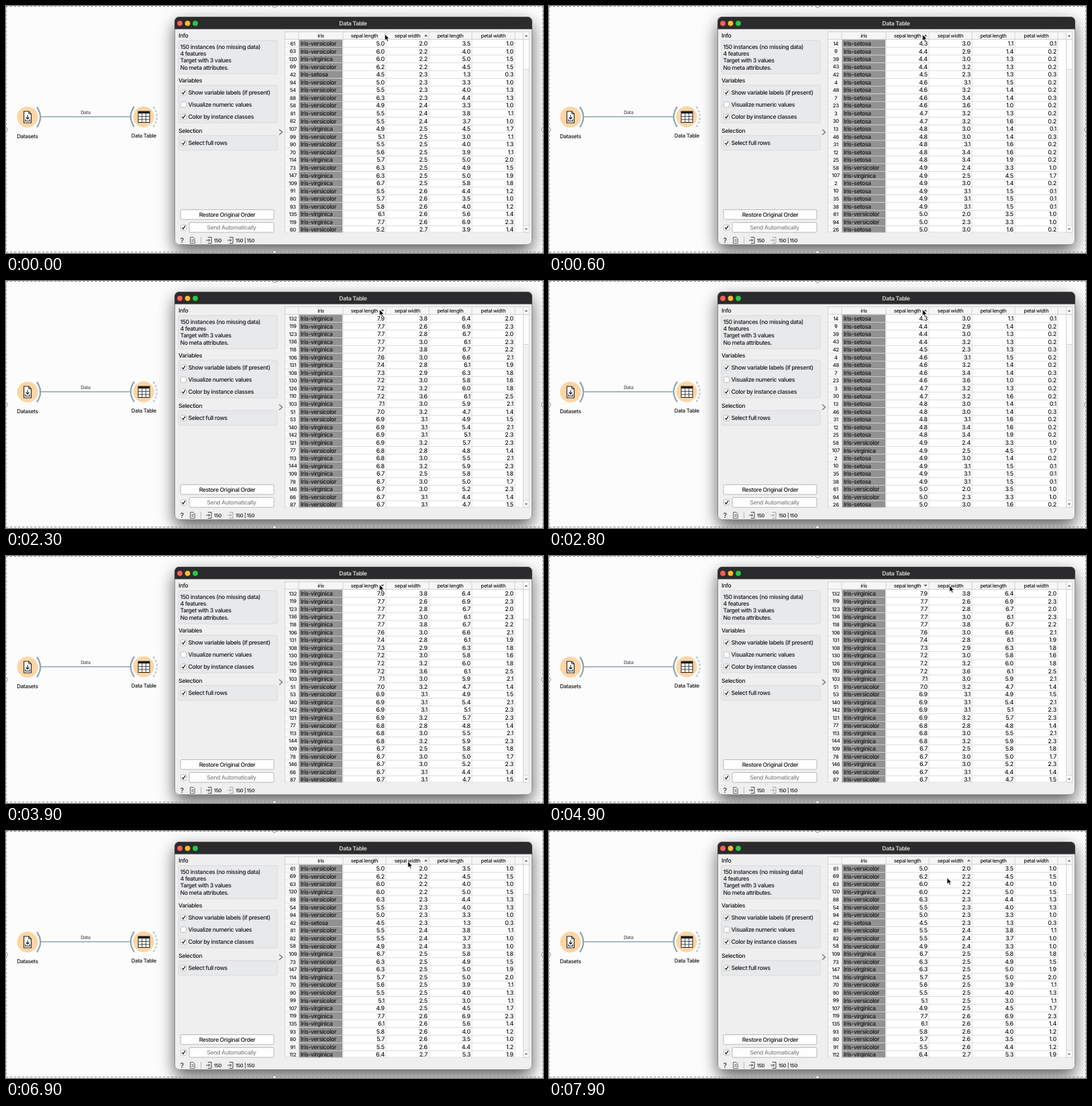
An HTML page that plays this animation: 800 px wide and 368 px high, repeating every 8 s.

```html
<!DOCTYPE html>
<html lang="en">
<head>
<meta charset="utf-8">
<title>Data Table</title>
<style>
  html, body { margin: 0; width: 100%; height: 100%; overflow: hidden; background: #fcfcfc; }
  svg { display: block; width: 800px; height: 368px; }
  text {
    font-family: Inter, "Liberation Sans", sans-serif; font-weight: 500; letter-spacing: -.04em;
    fill: #151515; text-rendering: geometricPrecision;
  }
</style>
</head>
<body>
<svg id="stage" viewBox="0 0 800 368" xmlns="http://www.w3.org/2000/svg">
  <defs>
    <filter id="shadow" x="-20%" y="-20%" width="140%" height="140%">
      <feGaussianBlur stdDeviation="12"/>
    </filter>
    <clipPath id="tableClip"><rect x="415" y="38" width="365" height="299.5"/></clipPath>
    <clipPath id="winClip"><rect x="251" y="16" width="533" height="340" rx="7"/></clipPath>
  </defs>
  <rect width="800" height="368" fill="#fcfcfc"/>
  <g id="flow"></g>
  <rect x="251" y="25" width="533" height="341" rx="9" fill="#000" opacity=".62" filter="url(#shadow)"/>
  <g id="marquee"></g>
  <g id="win" clip-path="url(#winClip)"></g>
  <rect x="251.5" y="16.5" width="532" height="339" rx="7" fill="none" stroke="#555" stroke-opacity=".65"/>
  <g id="table" clip-path="url(#tableClip)"></g>
  <g id="scroll"></g>
  <path id="sortMark" fill="#555"/>
  <path id="pointer" d="M0 0V9.2L2.2 7.3L3.7 10.7L5.3 10L3.9 6.7H6.8Z"
        fill="#000" stroke="#fff" stroke-width=".7" stroke-linejoin="round"/>
</svg>
<script>
const $ = id => document.getElementById(id);

function add(parent, tag, attrs, content) {
  const el = document.createElementNS("http://www.w3.org/2000/svg", tag);
  for (const key in attrs) el.setAttribute(key, attrs[key]);
  if (content !== undefined) el.textContent = content;
  parent.appendChild(el);
  return el;
}
const rect = (p, x, y, width, height, fill, more) => add(p, "rect", { x, y, width, height, fill, ...more });
const path = (p, d, stroke, more) => add(p, "path", { d, stroke, fill: "none", ...more });
const disc = (p, cx, cy, r, fill, more) => add(p, "circle", { cx, cy, r, fill, ...more });
const label = (p, x, y, size, str, more) => add(p, "text", { x, y, "font-size": size, ...more }, str);
const middle = { "text-anchor": "middle" };

// Rows: number, sepal length, sepal width, petal length, petal width
const records = {
  "Iris-setosa": `2 4.9 3.0 1.4 0.2|3 4.7 3.2 1.3 0.2|4 4.6 3.1 1.5 0.2|7 4.6 3.4 1.4 0.3
    |9 4.4 2.9 1.4 0.2|10 4.9 3.1 1.5 0.1|12 4.8 3.4 1.6 0.2|13 4.8 3.0 1.4 0.1
    |14 4.3 3.0 1.1 0.1|23 4.6 3.6 1.0 0.2|25 4.8 3.4 1.9 0.2|26 5.0 3.0 1.6 0.2
    |30 4.7 3.2 1.6 0.2|31 4.8 3.1 1.6 0.2|35 4.9 3.1 1.5 0.1|38 4.9 3.1 1.5 0.1
    |39 4.4 3.0 1.3 0.2|42 4.5 2.3 1.3 0.3|43 4.4 3.2 1.3 0.2|46 4.8 3.0 1.4 0.3
    |48 4.6 3.2 1.4 0.2`,
  "Iris-versicolor": `51 7.0 3.2 4.7 1.4|53 6.9 3.1 4.9 1.5|54 5.5 2.3 4.0 1.3|58 4.9 2.4 3.3 1.0
    |60 5.2 2.7 3.9 1.4|61 5.0 2.0 3.5 1.0|63 6.0 2.2 4.0 1.0|66 6.7 3.1 4.4 1.4
    |69 6.2 2.2 4.5 1.5|70 5.6 2.5 3.9 1.1|73 6.3 2.5 4.9 1.5|77 6.8 2.8 4.8 1.4
    |78 6.7 3.0 5.0 1.7|80 5.7 2.6 3.5 1.0|81 5.5 2.4 3.8 1.1|82 5.5 2.4 3.7 1.0
    |87 6.7 3.1 4.7 1.5|88 6.3 2.3 4.4 1.3|90 5.5 2.5 4.0 1.3|91 5.5 2.6 4.4 1.2
    |93 5.8 2.6 4.0 1.2|94 5.0 2.3 3.3 1.0|99 5.1 2.5 3.0 1.1`,
  "Iris-virginica": `103 7.1 3.0 5.9 2.1|106 7.6 3.0 6.6 2.1|107 4.9 2.5 4.5 1.7|108 7.3 2.9 6.3 1.8
    |109 6.7 2.5 5.8 1.8|110 7.2 3.6 6.1 2.5|112 6.4 2.7 5.3 1.9|113 6.8 3.0 5.5 2.1
    |114 5.7 2.5 5.0 2.0|118 7.7 3.8 6.7 2.2|119 7.7 2.6 6.9 2.3|120 6.0 2.2 5.0 1.5
    |121 6.9 3.2 5.7 2.3|123 7.7 2.8 6.7 2.0|126 7.2 3.2 6.0 1.8|130 7.2 3.0 5.8 1.6
    |131 7.4 2.8 6.1 1.9|132 7.9 3.8 6.4 2.0|135 6.1 2.6 5.6 1.4|136 7.7 3.0 6.1 2.3
    |140 6.9 3.1 5.4 2.1|142 6.9 3.1 5.1 2.3|144 6.8 3.2 5.9 2.3|146 6.7 3.0 5.2 2.3
    |147 6.3 2.5 5.0 1.9`
};
// Each row: [number, class, sepal length, sepal width, petal length, petal width]
const rows = Object.entries(records).flatMap(([name, list]) =>
  list.split("|").map(line => {
    const [id, ...values] = line.trim().split(/\s+/);
    return [id, name, ...values];
  }));

const LENGTH = 2, WIDTH = 3, ROWS = 25, ROW_H = 11.56, TOP = 50;
const sorted = (col, dir, tie, tieDir) => [...rows].sort((a, b) =>
  dir * (a[col] - b[col]) || tieDir * (a[tie] - b[tie])).slice(0, ROWS);

const view = (col, dir, tieDir) => ({ col, dir, rows: sorted(col, dir, col === LENGTH ? WIDTH : LENGTH, tieDir) });
const rising = view(LENGTH, 1, 1), falling = view(LENGTH, -1, 1);
const clicks = [
  [0, view(WIDTH, 1, 1)], [400, rising], [1200, falling],
  [2400, rising], [3900, falling], [5300, view(WIDTH, 1, -1)]
];

function drawFlow() {
  const g = $("flow"), blue = "#8ba4b2", ink = "#1c1c1c", arc = { "stroke-width": 2.2 };
  path(g, "M52 165H186", blue, { "stroke-width": 1.6 });
  disc(g, 32, 165.5, 15.5, "#fdd5a4");
  disc(g, 205, 165, 15.5, "#fdd5a4");
  path(g, "M46 150.5Q56.5 165.5 46 180.5", blue, arc);
  path(g, "M191 150Q180.5 165 191 180", blue, arc);
  path(g, "M219.5 150Q230 165 219.5 180", "#b9cad3", { ...arc, "stroke-dasharray": "3.4 2.4" });
  path(g, "M26.7 157H33.8L37.5 160.7V174H26.7Z", ink, { "stroke-width": 1.1, fill: "#fff" });
  path(g, "M33.8 157V160.7H37.5", ink, { "stroke-width": .9 });
  path(g, "M32.2 162.5V168.3M29.8 166L32.2 168.5L34.6 166M29 168.8V171.2H35.4V168.8", ink, { "stroke-width": 1.1 });
  rect(g, 197, 157, 17, 16.5, "#fff", { stroke: ink });
  rect(g, 197, 157, 17, 3.2, ink);
  path(g, "M197 164.6H214M197 169H214M202.7 160V173.5M208.4 160V173.5", ink, { "stroke-width": .8 });
  label(g, 118.5, 161, 7.1, "Data", { ...middle, style: "fill:#555" });
  label(g, 32, 197, 8.1, "Datasets", middle);
  label(g, 205.3, 196.3, 7.9, "Data Table", middle);
}

function drawMarquee() {
  const g = $("marquee"), dash = { "stroke-dasharray": "3.4 2.6" };
  path(g, "M0 .5H800M0 366.5H800", "#8d8d8d", dash);
  path(g, "M.5 0V368M799.5 0V368", "#a5a5a5", dash);
  for (const [x, y] of [[400, 0], [400, 367], [0, 184], [800, 184]])
    disc(g, x, y, 2.6, "#eee", { stroke: "#888", "stroke-width": .8 });
}

function checkbox(g, cy, on) {
  rect(g, 260.4, cy - 4.1, 8.2, 8.2, "#fff", { rx: 1.4, stroke: "#b0b0b0", "stroke-width": .8 });
  if (on) path(g, `M262.3 ${cy}L264 ${cy + 2.2}L267 ${cy - 2.6}`, "#222", { "stroke-width": 1.3 });
}

function ioIcon(g, x) {
  path(g, `M${x + 3} 345V344.5H${x + 8}V353.5H${x + 3}V353M${x} 349H${x + 5.5}M${x + 3.6} 347L${x + 5.6} 349L${x + 3.6} 351`,
    "#333", { "stroke-width": .9 });
}

function drawWindow() {
  const g = $("win");
  rect(g, 251, 16, 533, 340, "#efeff0");
  rect(g, 251, 16, 533, 18.5, "#2b2a2c");
  ["#ff5f57", "#febc2e", "#28c840"].forEach((c, i) => disc(g, 259 + i * 11.5, 25.8, 3.9, c));
  label(g, 517, 28.8, 8.7, "Data Table", { ...middle, style: "font-weight:700;fill:#c9c9c9" });

  const box = (y, h) => rect(g, 257, y, 147, h, "#e8e9eb", { rx: 2, stroke: "#d4d5d7", "stroke-width": .8 });
  box(51.5, 49.5); box(118, 56); box(193, 22);
  label(g, 257, 47.4, 8.65, "Info");
  label(g, 257, 114, 8.65, "Variables");
  label(g, 257, 189, 8.65, "Selection");
  ["150 instances (no missing data)", "4 features", "Target with 3 values", "No meta attributes."]
    .forEach((s, i) => label(g, 259.5, 63.7 + i * 10.35, 8.65, s));
  [["Show variable labels (if present)", 129, true], ["Visualize numeric values", 147, false],
   ["Color by instance classes", 165, true], ["Select full rows", 204.2, true]].forEach(([s, y, on]) => {
    checkbox(g, y, on);
    label(g, 271.5, y + 3, 8.7, s);
  });
  path(g, "M407 184L411.6 188L407 192", "#777", { "stroke-width": 1.4 });

  const button = (x, y, s, color) => {
    rect(g, x, y, 399 - x, 14.6, "#fefefe", { rx: 1.5, stroke: "#b0b0b0", "stroke-width": .9 });
    label(g, (x + 399) / 2, y + 10.4, 8.6, s, { ...middle, style: "fill:" + color });
  };
  button(260, 303.4, "Restore Original Order", "#151515");
  button(273, 322.6, "Send Automatically", "#858585");
  checkbox(g, 330, true);

  label(g, 259.6, 353, 10.5, "?", { style: "fill:#333" });
  path(g, "M274.5 344.5H279L281.2 347V353.5H274.5ZM276 348.3H279.8M276 350.5H279.8", "#444", { "stroke-width": .8 });
  path(g, "M290.5 344V354", "#aaa", { "stroke-width": .8 });
  ioIcon(g, 298);
  label(g, 309.7, 351.8, 7.3, "150");
  ioIcon(add(g, "g", { id: "output" }), 330);
  label(g, 342, 351.8, 7.3, "150 | 150");
}

// Returns the text elements of every row
function drawTable() {
  const g = $("table"), edges = [436, 502, 566, 630, 694, 758];
  rect(g, 415, 38, 365, 300, "#fff");
  rect(g, 415, 38, 355, 12, "#f6f6f6");
  path(g, "M415 49.7H770M415.4 38V338M415 38.4H770", "#c4c4c4", { "stroke-width": .8 });
  for (const x of edges) path(g, `M${x} 39V50`, "#c9c9c9", { "stroke-width": .8 });
  ["iris", "sepal length", "sepal width", "petal length", "petal width"].forEach((s, i) =>
    label(g, (edges[i] + edges[i + 1]) / 2, 46.8, 7.6, s, middle));

  const cells = [];
  for (let i = 0; i < ROWS; i++) {
    const y = TOP + i * ROW_H, base = y + 9;
    rect(g, 416, y, 20, ROW_H, "#f7f7f7");
    rect(g, 436.6, y + .3, 64.6, ROW_H - .6, "#929292");
    path(g, `M416 ${y + ROW_H}H758`, "#d3d3d3", { "stroke-width": .8 });
    cells.push([
      label(g, 427.3, base - .2, 7.7, "", middle),
      label(g, 439, base, 8.75, ""),
      ...edges.slice(2).map(x => label(g, x - 2.1, base, 8.95, "", { "text-anchor": "end" }))
    ]);
  }
  for (const x of edges) path(g, `M${x} 50V338`, "#d3d3d3", { "stroke-width": .8 });
  path(g, "M415 337.2H780", "#c4c4c4", { "stroke-width": .8 });
  return cells;
}

function drawScroll() {
  const g = $("scroll"), line = { stroke: "#cfcfcf", "stroke-width": .8 };
  rect(g, 770.4, 38.4, 9.2, 298.8, "#f1f1f1", line);
  rect(g, 770.4, 38.4, 9.2, 11.4, "#fafafa", line);
  rect(g, 770.4, 50, 9.2, 44.5, "#fcfcfc", line);
  rect(g, 770.4, 327, 9.2, 10.2, "#fafafa", line);
  add(g, "path", { d: "M772.8 45.4H777.2L775 43ZM772.8 331.4H777.2L775 333.8Z", fill: "#555" });
}

drawFlow();
drawMarquee();
drawWindow();
const cells = drawTable();
drawScroll();

// Pointer stops: time, x, y
const stops = [[0, 564.3, 42], [300, 556.3, 42.5], [4300, 556.3, 42.5],
  [5000, 599, 44.3], [6800, 599, 44.3], [7600, 593, 69.7], [8000, 593, 69.7]];

function pointerAt(t) {
  const i = stops.findIndex(s => s[0] > t);
  const [t0, x0, y0] = stops[i - 1], [t1, x1, y1] = stops[i];
  const u = (t - t0) / (t1 - t0), e = u * u * (3 - 2 * u);
  return [x0 + (x1 - x0) * e, y0 + (y1 - y0) * e];
}

let shown = null;
function show(v) {
  if (v === shown) return;
  shown = v;
  v.rows.forEach((row, i) => row.forEach((s, j) => cells[i][j].textContent = s));
  const x = v.col === LENGTH ? 561 : 625.5;
  $("sortMark").setAttribute("d", v.dir > 0
    ? `M${x - 2.6} 45.2H${x + 2.6}L${x} 42.6Z` : `M${x - 2.6} 42.8H${x + 2.6}L${x} 45.4Z`);
  $("output").setAttribute("opacity", v.col === LENGTH ? .45 : 1);
}

function render(now) {
  const t = Math.floor(now % 8000 / 100) * 100;
  show(clicks.filter(c => c[0] <= t).pop()[1]);
  $("pointer").setAttribute("transform", `translate(${pointerAt(t)})`);
}

let start = null;
function tick(now) {
  if (start === null) start = now;
  render(now - start);
  requestAnimationFrame(tick);
}
render(0);
requestAnimationFrame(tick);
</script>
</body>
</html>
```
